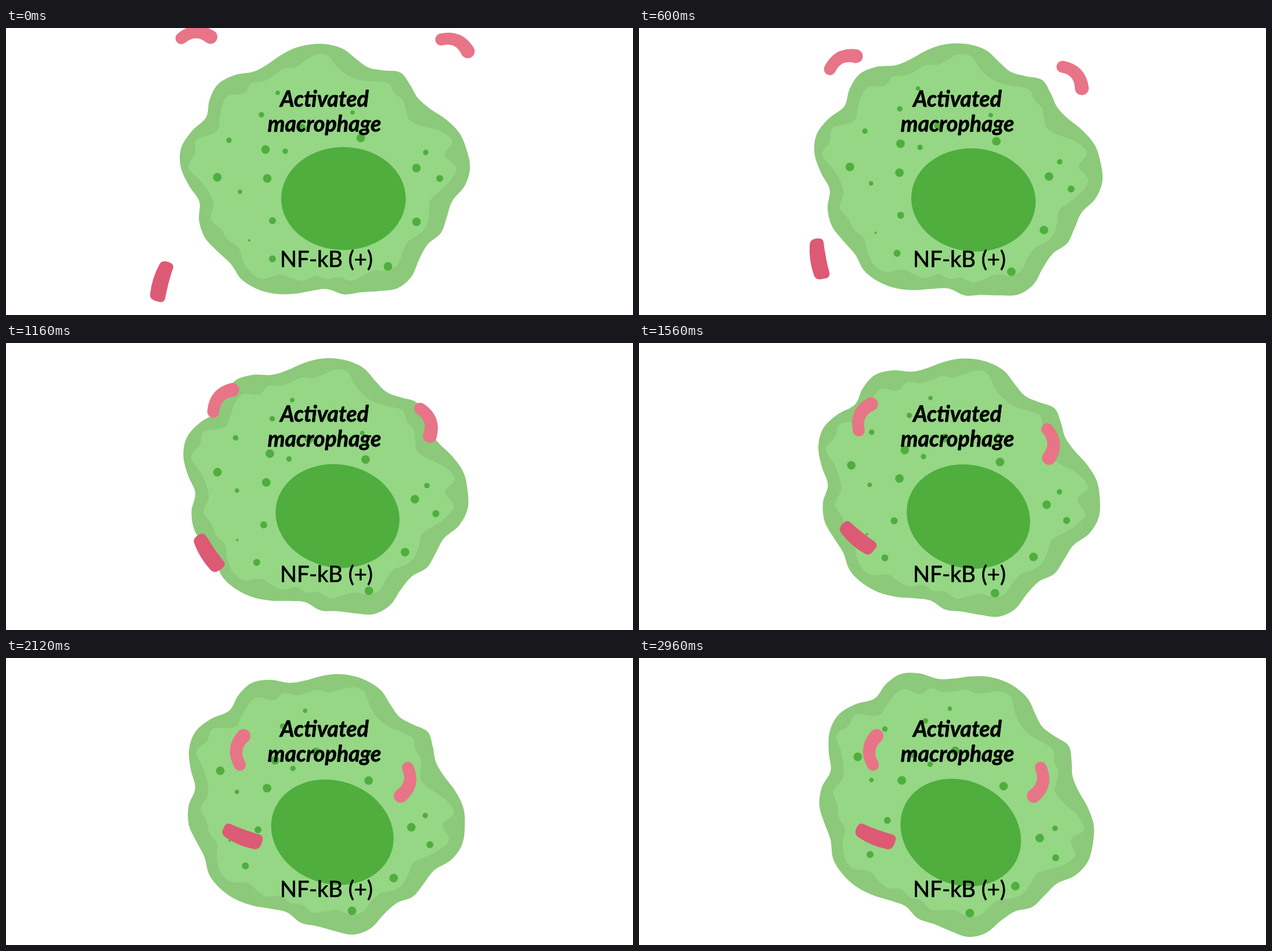
An HTML page with a canvas that plays this animation: 1080 px wide and 496 px high, repeating every 3000 ms.

```html
<!DOCTYPE html>
<html lang="en">
<head>
<meta charset="utf-8">
<title>Activated macrophage</title>
<style>
  html, body { margin: 0; width: 100%; height: 100%; overflow: hidden; background: #fff; }
  canvas { display: block; width: 100%; height: 100%; }
</style>
</head>
<body>
<canvas id="stage" width="1080" height="496"></canvas>
<script>
const ctx = document.getElementById('stage').getContext('2d');
const LOOP = 3000, STEP = 40, TRAVEL = 2000;
const SPIN = 9.05 / 1000; // degrees per ms
const HUB_X = 553.3, HUB_Y = 241.3;
const RAD = Math.PI / 180;
const RIM = '#8cc97a', BODY = '#95d785', CORE = '#4fae3e';
const PINK = '#e87487', RED = '#dd5a74';

// radii at even angles, clockwise from the right
const rim = [
  246, 239, 223, 223, 226, 218, 224, 238, 241, 231, 223, 221,
  210, 215, 226, 236, 242, 243, 235, 238, 243, 239, 228, 240,
  252, 254, 242, 226, 234, 237, 226, 209, 206, 210, 214, 215,
  213, 207, 194, 187, 194, 207, 202, 197, 204, 220, 235, 242
];
const body = [
  222, 213, 198, 186, 192, 198, 196, 189, 195, 207, 205, 195,
  197, 200, 190, 193, 188, 200, 201, 202, 222, 224, 217, 206,
  212, 212, 219, 206, 208, 219, 239, 229, 230, 201, 203, 210,
  211, 192, 196, 185, 184, 187, 182, 188, 196, 194, 174, 164,
  161, 164, 172, 180, 173, 175, 168, 164, 178, 205, 220, 204
];

// closed Catmull-Rom curve around the hub
function blob(radii, color) {
  const n = radii.length;
  const at = i => {
    const a = i / n * 2 * Math.PI, r = radii[(i + n) % n];
    return { x: HUB_X + r * Math.cos(a), y: HUB_Y + r * Math.sin(a) };
  };
  ctx.beginPath();
  ctx.moveTo(at(0).x, at(0).y);
  for (let i = 0; i < n; i++) {
    const a = at(i - 1), b = at(i), c = at(i + 1), d = at(i + 2);
    ctx.bezierCurveTo(
      b.x + (c.x - a.x) / 6, b.y + (c.y - a.y) / 6,
      c.x - (d.x - b.x) / 6, c.y - (d.y - b.y) / 6, c.x, c.y);
  }
  ctx.fillStyle = color;
  ctx.fill();
}

function oval(x, y, rx, ry = rx) {
  ctx.beginPath();
  ctx.ellipse(x, y, rx, ry, 0, 0, 2 * Math.PI);
  ctx.fill();
}

function dots(r, ...xy) {
  for (let i = 0; i < xy.length; i += 2) oval(xy[i], xy[i + 1], r);
}

function bean() {
  const tilt = 52.8 * RAD;
  ctx.translate(0, 3);
  ctx.arc(-25, 0, 10.3, tilt, tilt + Math.PI);
  ctx.quadraticCurveTo(0, -31.7, 25 + 12 * Math.cos(tilt), -12 * Math.sin(tilt));
  ctx.arc(25, 0, 12, -tilt, Math.PI - tilt);
  ctx.quadraticCurveTo(0, -6.3, -25 + 10.3 * Math.cos(tilt), 10.3 * Math.sin(tilt));
}

function rod() {
  ctx.moveTo(-27, -13.5);
  ctx.quadraticCurveTo(0, -12, 28, -14.5);
  ctx.quadraticCurveTo(35.5, -14, 35.5, -5);
  ctx.lineTo(35.5, 2);
  ctx.quadraticCurveTo(35, 11, 27, 12.5);
  ctx.quadraticCurveTo(0, 17, -26, 11);
  ctx.quadraticCurveTo(-34, 9.5, -35, 2);
  ctx.quadraticCurveTo(-36.5, -13.5, -27, -13.5);
}

function drawCell(t) {
  ctx.save();
  ctx.translate(HUB_X, HUB_Y);
  ctx.rotate(t * SPIN * RAD);
  ctx.translate(-HUB_X, -HUB_Y);
  blob(rim, RIM);
  blob(body, BODY);
  ctx.fillStyle = CORE;
  oval(581.3, 294.8, 107.3, 89);
  dots(7.4, 447, 210, 364, 258, 450, 260, 658, 412, 707, 335, 707, 242, 611, 190, 509, 173);
  dots(6, 459, 333, 459, 399, 747, 260);
  dots(4.7, 440, 150, 384, 194, 481, 213, 723, 215);
  dots(3.8, 468, 112, 403, 283, 597, 146);
  dots(2, 419, 367);
  ctx.restore();
}

function drawGerm(shape, color, x, y, deg) {
  ctx.save();
  ctx.translate(x, y);
  ctx.rotate(deg * RAD);
  ctx.beginPath();
  shape();
  ctx.fillStyle = color;
  ctx.fill();
  ctx.restore();
}

function drawGerms(t) {
  const k = Math.min(t / TRAVEL, 1);
  const go = (from, to) => from + (to - from) * k;
  drawGerm(bean, PINK, go(327, 403), go(13.5, 159.3), go(-2.5, -83));
  drawGerm(bean, PINK, go(773.7, 689), go(27.3, 214.7), go(24, 104));
  drawGerm(rod, RED, go(267.5, 406.5), go(437.5, 309), go(105.5, 21));
}

// a thin round outline softens the letter corners
function label(text, x, y, font, weight) {
  ctx.font = font + ' Lato, "Open Sans", sans-serif';
  ctx.textAlign = 'center';
  ctx.lineJoin = 'round';
  ctx.lineWidth = weight;
  ctx.fillStyle = ctx.strokeStyle = '#000';
  ctx.fillText(text, x, y);
  ctx.strokeText(text, x, y);
}

function draw(now) {
  const t = Math.floor(now % LOOP / STEP) * STEP;
  ctx.fillStyle = '#fff';
  ctx.fillRect(0, 0, 1080, 496);
  drawCell(t);
  drawGerms(t);
  label('Activated', 548.5, 135.5, 'italic 700 37.5px', 0.8);
  label('macrophage', 548.5, 179, 'italic 700 37.5px', 0.8);
  label('NF-kB (+)', 552, 413, '400 38px', 0.7);
  requestAnimationFrame(draw);
}
requestAnimationFrame(draw);
</script>
</body>
</html>
```
